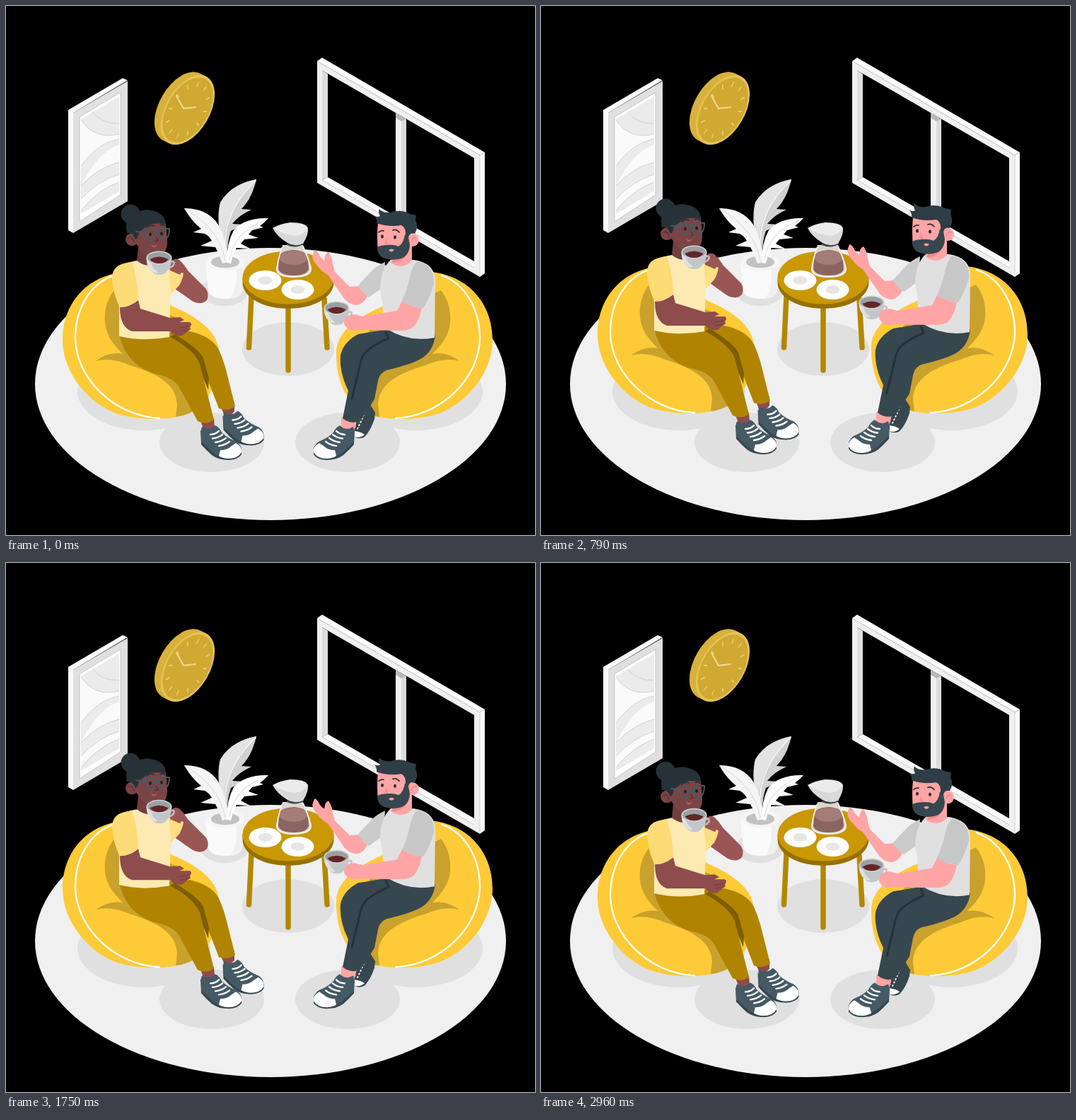
Recreate the animation shown at these times as an HTML page. Size 748 px wide and 748 px high, loop 3 s.

```html
<!DOCTYPE html>
<html lang="en">
<head>
<meta charset="utf-8">
<title>Coffee break</title>
<style>
html, body { margin: 0; width: 100%; height: 100%; overflow: hidden; background: #000; }
svg { display: block; width: 100%; height: 100%; }
.line { fill: none; stroke-linecap: round; stroke-linejoin: round; }
</style>
</head>
<body>
<svg viewBox="0 0 748 748">
  <defs>
    <g id="bag">
      <path fill="#fdcb38" d="M168 376C113 381 80 422 80 472C80 522 122 567 162 578C190 586 232 586 256 577C284 566 302 533 301 489C300 462 274 441 236 425Z"/>
      <path fill="#c9a12d" d="M153 402C140 418 137 440 142 458C147 474 156 482 165 492Q146 488 127 502Q148 496 175 508C215 520 241 535 242 564L240 581Q262 578 274 566L284 500L240 440L170 410Z"/>
      <path class="line" stroke="#fff" stroke-width="2.3" d="M152 381C117 394 98 430 98 470C99 527 153 580 217 583"/>
    </g>
    <g id="shoe">
      <path fill="#37474f" d="M275 600L276 620Q284 629 291 635Q300 642 315 642Q329 641 333 634L333 628Z"/>
      <path fill="#455a64" d="M276 599Q276 593 281 597Q289 600 296 593Q302 596 305 603Q313 611 326 616Q334 622 333 630Q325 640 310 639Q298 637 290 629L276 616Z"/>
      <path fill="#fff" d="M303 628Q313 628 319 622L325 618Q334 623 333 631Q328 640 314 640Q304 639 301 636Z"/>
      <path class="line" stroke="#fff" stroke-width="2.4" d="M289 606Q296 606 301 601M292 611.500Q300 611 306 606M296 617Q305 616 311 611M301 622Q310 621 316 616"/>
    </g>
    <g id="cup">
      <path class="line" stroke="#bcc0c3" stroke-width="2.500" d="M17 6Q22 4 21 9Q19 13 14 14"/>
      <path fill="#c3c7ca" d="M-18 0Q-18 14 -9 20Q-7 24 0 24Q8 24 10 20Q18 13 18 0Z"/>
      <path fill="#dfe2e3" d="M-18 1Q-17 14 -9 20Q-3 23 -2 20Q-10 15 -12 6Z"/>
      <ellipse rx="18" ry="9.5" fill="#d0d3d5"/>
      <ellipse rx="16.200" ry="8" fill="#9b9fa2"/>
      <path fill="#642528" d="M-13 2Q0 -5 13 2Q9 8 0 8Q-9 8 -13 2Z"/>
    </g>
    <g id="plate">
      <ellipse rx="23" ry="14" fill="#fff"/>
      <ellipse rx="10" ry="6" fill="#e6e6e6"/>
    </g>
    <clipPath id="art"><path d="M106 160L160 128V262L106 294Z"/></clipPath>
    <linearGradient id="brass" x1="0" y1="0" x2=".4" y2="1">
      <stop offset=".6" stop-color="#d8b13d"/>
      <stop offset="1" stop-color="#b8912b"/>
    </linearGradient>
  </defs>

  <!-- Room -->
  <ellipse cx="374" cy="534.5" rx="333" ry="192.5" fill="#f0f0f0"/>
  <g fill="#e0e0e0">
    <ellipse cx="399" cy="485" rx="65" ry="38"/>
    <ellipse cx="309" cy="403" rx="34" ry="21"/>
    <ellipse cx="195" cy="545" rx="94" ry="55"/>
    <ellipse cx="580" cy="545" rx="94" ry="55"/>
    <ellipse cx="291" cy="617" rx="74" ry="42"/>
    <ellipse cx="483" cy="617" rx="74" ry="42"/>
  </g>

  <!-- Picture -->
  <path fill="#fafafa" d="M88 147L165 102L172 105L95 151V321L88 317Z"/>
  <path fill="#e0e0e0" d="M95 151L172 106V276L95 321Z"/>
  <path fill="#fff" stroke="#b5b5b5" stroke-width=".7" d="M104 157L162 122V267L104 305Z"/>
  <g clip-path="url(#art)">
    <path fill="#ebebeb" d="M100 120H165V300H100Z"/>
    <path fill="#fafafa" d="M106 161Q125 190 160 181V188Q130 193 106 226ZM106 254Q130 206 160 196V221Q132 227 106 254ZM106 273Q130 247 160 238V249Q132 258 106 289Z"/>
    <path class="line" stroke="#c9c9c9" stroke-width=".8" d="M106 161Q125 190 160 181M122 150Q136 167 160 166M106 226Q130 193 160 188M106 254Q132 227 160 221M106 273Q130 247 160 238M106 289Q132 258 160 249"/>
  </g>

  <!-- Clock -->
  <g id="clockEdge" fill="url(#brass)"></g>
  <g transform="matrix(.866 -.5 0 1 257 147)">
    <circle r="44" fill="#e5c354"/>
    <circle r="41" fill="#d0a932"/>
    <g id="ticks" class="line" stroke="#ebcf78" stroke-width="1.800"></g>
  </g>
  <path class="line" stroke="#f0d88e" stroke-width="2.200" d="M241 127L251 145L268 143"/>

  <!-- Window -->
  <path fill="#fff" d="M440 78L447 73L677 207L670 211Z"/>
  <path fill="#fafafa" d="M670 211L677 207V378L670 383Z"/>
  <path fill="#f0f0f0" fill-rule="evenodd" d="M440 78L670 211V383L440 250ZM447 91V246L662 370V215Z"/>
  <path fill="#dedede" d="M447 91L455 96V242L447 246Z"/>
  <path fill="#fafafa" d="M447 246L455 242L662 361V370Z"/>
  <path fill="#f0f0f0" d="M551 151L559 156V311L551 306Z"/>
  <path fill="#dcdcdc" d="M559 156L566 160V302L559 306Z"/>
  <path fill="#b8b8b8" d="M551 151L566 160L559 163L551 158Z"/>
  <path class="line" stroke="#bbb" stroke-width=".6" d="M440 78L670 211V383M670 211L677 207"/>

  <!-- Plant -->
  <path fill="#fafafa" d="M282 363L286 402Q288 414 311 414Q332 414 334 402L338 362Z"/>
  <path fill="#f0f0f0" d="M326 372L338 362L334 402Q332 413 317 414Q327 400 326 372Z"/>
  <ellipse cx="310" cy="362" rx="28" ry="12.5" fill="#f5f5f5"/>
  <ellipse cx="310" cy="362" rx="20" ry="8.5" fill="#c2c2c2"/>
  <path fill="#d2d2d2" d="M354 245Q318 252 303 278Q296 302 308 356L313 350Q313 332 318 318L336 309L320 308Q329 296 347 288L333 287Q348 272 354 245Z"/>
  <path fill="#e3e3e3" d="M354 245Q318 252 303 278Q298 300 307 340Q307 291 354 245Z"/>
  <path class="line" stroke="#f5f5f5" stroke-width="1.600" d="M353 247Q304 293 310 352"/>
  <path fill="#f5f5f5" d="M252 286Q285 286 300 309Q313 334 314 362L306 364Q301 350 296 341L275 339L291 332Q287 325 281 322L265 320L276 315Q262 304 252 286Z"/>
  <path fill="#fff" d="M371 300Q338 299 322 317Q312 335 312 363L318 364Q321 350 326 342L345 343L332 336L337 330L357 328L343 323L348 317L364 313L359 311Q365 307 371 300Z"/>
  <path class="line" stroke="#dedede" stroke-width="1.200" d="M366 303Q322 319 316 359M253 287Q302 315 310 360"/>

  <!-- Table -->
  <g class="line" stroke="#b38700" stroke-width="7.500">
    <path d="M347 410L343.500 483M450 414L454 483M399 420V515"/>
  </g>
  <path fill="#967000" d="M334.500 384V391A64.500 37 0 0 0 463.500 391V384Z"/>
  <ellipse cx="399" cy="384" rx="64.500" ry="37.500" fill="#c99804"/>
  <use href="#plate" x="366.500" y="388"/>
  <use href="#plate" x="412.500" y="401"/>
  <path fill="#dcd6cd" d="M391 338Q387 353 382 371Q382 384 407 384Q432 384 432 372Q428 354 420 338Z"/>
  <path fill="#8b6360" d="M386 355Q388 346 407 345Q425 346 427 357L428 372Q425 381 407 381Q388 381 385 372Z"/>
  <ellipse cx="406.500" cy="356" rx="20" ry="10" fill="#a57c77"/>
  <path class="line" stroke="#f2f0ed" stroke-width="1.800" d="M390 342Q386 354 383 370Q381 383 407 383Q433 382 431 370Q427 355 420 340"/>
  <path class="line" stroke="#37474f" stroke-width="2.500" d="M398 337Q410 342 420 336"/>
  <path fill="#d9d9d9" d="M377 314Q387 308 402 306Q424 306 427 314Q428 323 420 336Q408 341 398 335Q383 326 377 314Z"/>
  <path fill="#ebebeb" d="M378 314Q388 308 403 307Q423 307 426 314Q423 323 409 325Q390 323 378 314Z"/>

  <g id="seated">
    <!-- Woman -->
    <use href="#bag"/>
    <path fill="#8e4b4c" d="M303 565L323 560L323 573Q317 582 308 577Z"/>
    <use href="#shoe" x="31.500" y="-20.500"/>
    <path fill="#8e4b4c" d="M274 583L294 583L295 596Q287 602 279 598Z"/>
    <use href="#shoe"/>
    <path fill="#b08400" d="M225 462L260 460Q291 467 301 486Q308 501 313 522L324 566Q313 574 301 569L284 525Z"/>
    <path fill="#7d5e00" d="M232 468L238 464Q272 484 279 498L287 527L286 543L270 505Z"/>
    <path fill="#b08400" d="M160 464Q195 475 232 468Q266 486 274 506L294 585Q284 593 271 587L246 541Q239 525 207 519Q169 505 160 464Z"/>

    <path fill="#9a5655" d="M231 365Q237 354 245 359Q252 365 257 374L282 399Q288 407 284 416Q276 424 263 417L236 398L228 379Z"/>
    <path fill="#fddf83" d="M229 369L251 378Q250 386 245 395L231 410Z"/>
    <path fill="#9a5655" d="M231 366L246 360L251 372L246 380L232 374Z"/>
    <path fill="#fdeab2" d="M150 386C151 368 167 363 186 360Q200 369 214 363L230 372L233 400L231 468Q195 475 160 467L160 426Z"/>
    <path fill="#fddb76" d="M150 386C150 369 160 364 178 362Q186 385 187 415Q176 425 161 426Q152 410 150 386Z"/>
    <path fill="#713d3e" d="M187 340L212 349L212 362Q200 372 185 360Z"/>
    <path fill="#8e4c4d" d="M161 426Q175 426 187 416L190 428L232 441L246 440L252 444L245 447L260 447Q264 450 260 454L261 457L249 466Q240 468 232 460L178 460Q161 454 161 426Z"/>
    <path class="line" stroke="#713d3e" stroke-width="1" d="M246 455L259 453M247 460L257 458"/>

    <path fill="#7a4445" d="M186 318Q193 302 226 307L228 330Q229 347 218 355Q205 357 193 349L184 336Z"/>
    <circle cx="178" cy="330" r="9" fill="#7a4445"/>
    <path class="line" stroke="#572c2e" stroke-width="1.300" d="M174 328Q178 325 181 334"/>
    <circle cx="176" cy="294" r="13.500" fill="#263238"/>
    <path fill="#263238" d="M171 303Q179 290 199 288Q221 290 225 303L226 309Q207 305 198 312L188 320Q187 328 183 330Q179 319 171 321Q169 311 171 303Z"/>
    <path class="line" stroke="#263238" stroke-width="1.700" d="M199 313Q204 308 209 311M218 310Q222 308 225 311"/>
    <g fill="#1c2023"><ellipse cx="204" cy="323" rx="1.900" ry="2.600"/><ellipse cx="220" cy="322" rx="1.900" ry="2.600"/></g>
    <path class="line" stroke="#455a64" stroke-width="2" d="M184 319L195 320M212 321L216 321M195 318Q204 315 212 317Q213 329 206 332Q197 331 195 318ZM216 317Q224 314 231 315Q231 328 224 331Q217 330 216 317Z"/>
    <path class="line" stroke="#572c2e" stroke-width="1.300" d="M212 327L215 332L211 333"/>
    <path fill="#b35a5b" d="M205 337Q210 341 214 337Q213 342 207 341Z"/>
    <use href="#cup" x="216.500" y="356"/>

    <!-- Man -->
    <use href="#bag" transform="matrix(-1 0 0 1 768 0)"/>
    <path fill="#37474f" d="M514 562L522 575L521 584Q515 602 506 610Q498 613 492 609L493 592Z"/>
    <path fill="#fff" d="M493 601Q502 602 507 606Q500 612 492 609Z"/>
    <path class="line" stroke="#fff" stroke-width="2" stroke-dasharray="1 4" d="M508 574L496 600"/>
    <path fill="#ffa5a5" d="M474 582L496 584L494 597Q484 602 474 596Z"/>
    <use href="#shoe" transform="matrix(-1 0 0 1 768 0)"/>
    <path fill="#37474f" d="M541 457Q570 474 607 466Q604 488 588 498Q576 506 538 515Q528 519 526 530L521 556L501 587Q487 592 476 583L484 544Q471 518 473 494Q477 475 498 464Z"/>
    <path class="line" stroke="#263238" stroke-width="3" d="M537 461L541 470Q522 478 510 488Q502 496 500 510L489 555"/>

    <path fill="#ffa5a5" d="M436 345Q440 345 444 354L450 360Q451 349 456 348Q461 355 462 365L465 376L486 397L498 396L511 410Q506 421 496 423Q487 423 479 415L455 380Q447 376 441 368Q431 357 434 351Z"/>
    <path fill="#cbcbcb" d="M536 362Q522 368 512 380L497 396Q504 405 513 412L534 397Z"/>
    <path fill="#e0e0e0" d="M545 358L577 359Q604 363 607 385L606 469Q570 476 539 457L530 452Q536 430 529 401Q529 372 545 358Z"/>
    <path fill="#c7c7c7" d="M581 361Q606 366 605 392Q600 412 590 427Q574 426 560 417Q567 402 571 384Q574 369 581 361Z"/>
    <path fill="#ffa5a5" d="M548 342L574 336V360Q562 374 544 363Z"/>
    <path fill="#f28c8c" d="M548 356Q559 358 568 348Q562 364 546 363Z"/>
    <use href="#cup" x="467.500" y="427"/>
    <path fill="#ffa5a5" d="M560 417Q574 426 588 427Q585 443 577 453Q572 459 555 459L500 458Q486 461 481 454Q476 450 479 443Q482 436 493 436L504 439L553 431Z"/>

    <path fill="#ffa5a5" d="M526 307Q547 302 566 310L570 343L555 354L526 348Q524 325 526 307Z"/>
    <circle cx="575" cy="331" r="9" fill="#ffa5a5"/>
    <path class="line" stroke="#eb8383" stroke-width="1.300" d="M573 333Q575 326 580 328"/>
    <path fill="#2f3e46" d="M524 307Q525 302 521 297Q526 299 529 297Q526 292 528 287Q532 293 544 292Q558 287 571 294L580 296L579 303Q584 312 578 322Q570 320 569 328L565 326Q566 313 559 310Q540 313 524 307Z"/>
    <path fill="#37474f" d="M525 341Q530 338 539 338Q549 337 555 340Q562 336 564 323L569 327L571 338Q570 353 559 357Q545 361 533 356Q525 352 525 341Z"/>
    <path fill="#ff8f91" d="M537 328L535 337L541 338Z"/>
    <path fill="#fa9c9b" d="M541 345Q545 342 549 345Q545 350 541 345Z"/>
    <g fill="#263238"><ellipse cx="532" cy="326" rx="2" ry="2.700"/><ellipse cx="550" cy="327" rx="2" ry="2.700"/></g>
    <path class="line" stroke="#263238" stroke-width="1.700" d="M527 320Q530 317 534 318M547 317Q552 315 556 320"/>
  </g>
</svg>
<script>
const LOOP = 3000, LIFT = 15, LEAD = 45;
const seated = document.getElementById('seated');
const fill = (id, count, part) => {
  document.getElementById(id).innerHTML = Array.from({ length: count }, (_, i) => part(i)).join('');
};

fill('ticks', 12, i => `<path d="M0 -35V-30" transform="rotate(${i * 30})"/>`);
// Overlapping discs give the clock its thickness.
fill('clockEdge', 9, i => `<circle r="44" transform="matrix(.866 -.5 0 1 ${248 + i} ${142.5 + i / 2})"/>`);

// Steady rise and fall, once per loop.
function draw(time) {
  const phase = ((time + LEAD) % LOOP) / LOOP;
  const rise = 1 - Math.abs(1 - 2 * phase);
  seated.setAttribute('transform', `translate(0 ${0.4 - LIFT * rise})`);
}

const start = performance.now();
function tick() {
  draw(performance.now() - start);
  requestAnimationFrame(tick);
}
tick();
</script>
</body>
</html>
```
